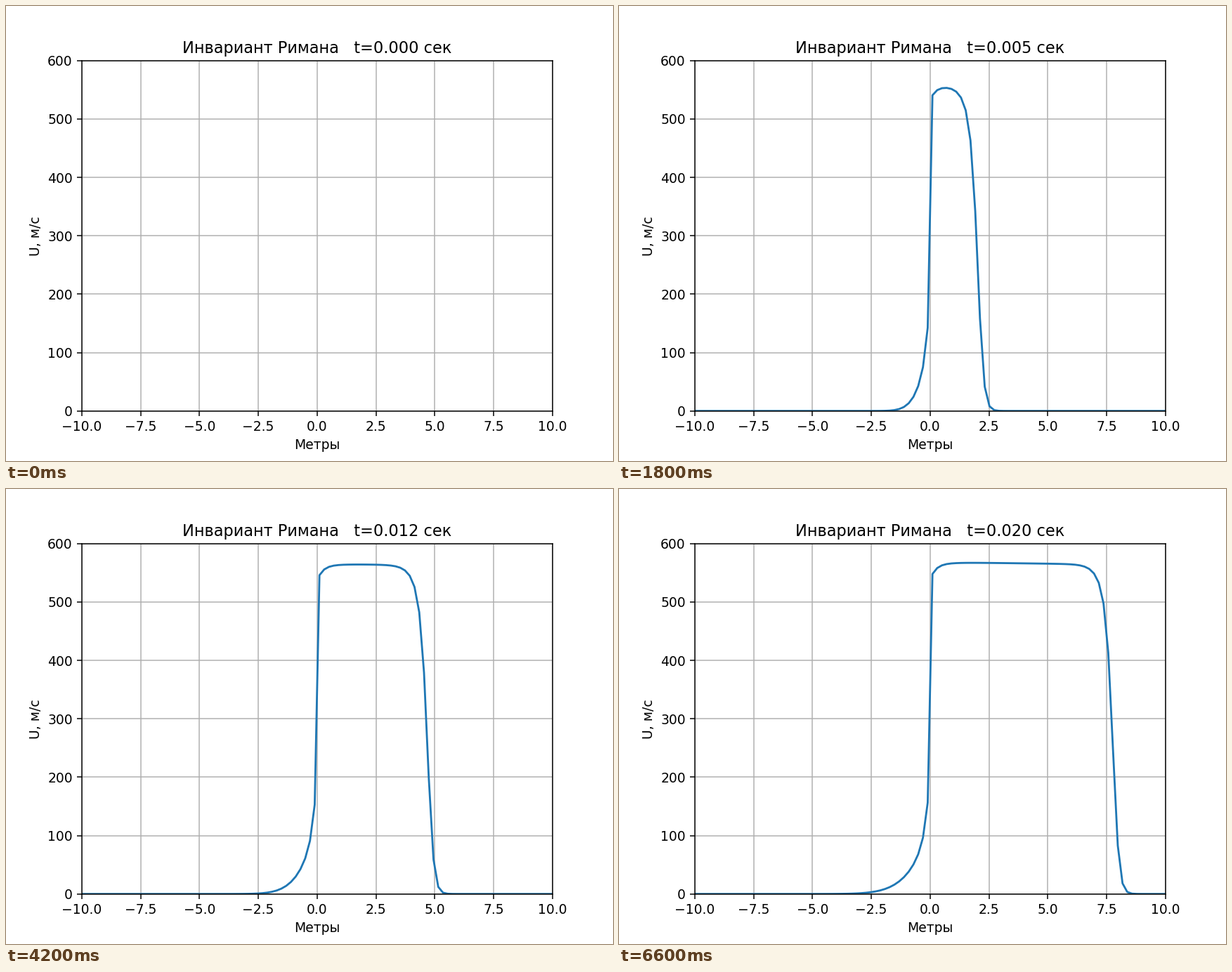
These frames come from a looping animation (864 px wide and 648 px high, 6.9 s). A matplotlib script:

```python
import numpy as np
import matplotlib.pyplot as plt
from matplotlib.animation import FuncAnimation

NODES = 100
x = np.linspace(-10, 10, NODES)
cell = np.arange(NODES // 2)  # cells counted outwards from x = 0

# Output times in ms; two of them are saved twice, one solver step apart.
times = sorted([*range(21), 1.01, 8.01])


def left_wave(t):
    """Diffuse wave creeping to the left of the discontinuity."""
    late = np.exp(4.58 - 0.213 * cell - 0.0065 * cell**2 + 0.473 * 0.44**cell)
    age = 1 / (t + 0.5) - 1 / 20.5
    return late * np.exp(-age * (0.70 + 0.99 * cell + 0.207 * cell**2))


def plateau(t):
    """Velocity behind the front, slowly rising towards its final level."""
    late = 568.3 - 0.11 * cell - 15.3 * 0.42**cell - 5 * 0.72**cell
    age = 1 / (t + 4) - 1 / 24
    return late - age * (138 - 38 * 0.6**cell)


def front(t):
    """Steady smeared shock, steeper ahead than behind."""
    pos = 1.888 * t - 0.085 + 0.017 * max(t - 12, 0)
    d = pos - cell
    softplus = np.logaddexp(0, 0.5 - d)
    logit = 0.66 * d - 1.1 * (softplus - np.logaddexp(0, 0.5))
    logit *= 1 + 0.25 / t**2
    return 1 / (1 + np.exp(-logit))


def velocity(t):
    return np.concatenate([left_wave(t)[::-1], plateau(t) * front(t)])


fig, ax = plt.subplots(figsize=(6.4, 4.8), dpi=135)
ax.set_xlim(-10, 10)
ax.set_ylim(0, 600)
ax.set_xlabel("Метры")
ax.set_ylabel("U, м/с")
ax.grid(True)
title = ax.set_title("")
line, = ax.plot([], [])


def update(i):
    t = times[i]
    title.set_text(f"Инвариант Римана   t={t / 1000:.3f} сек")
    if t == 0:
        line.set_data([], [])
    else:
        line.set_data(x, velocity(t))
    return line, title


anim = FuncAnimation(fig, update, frames=len(times), interval=300, repeat=True)
plt.show()
```
